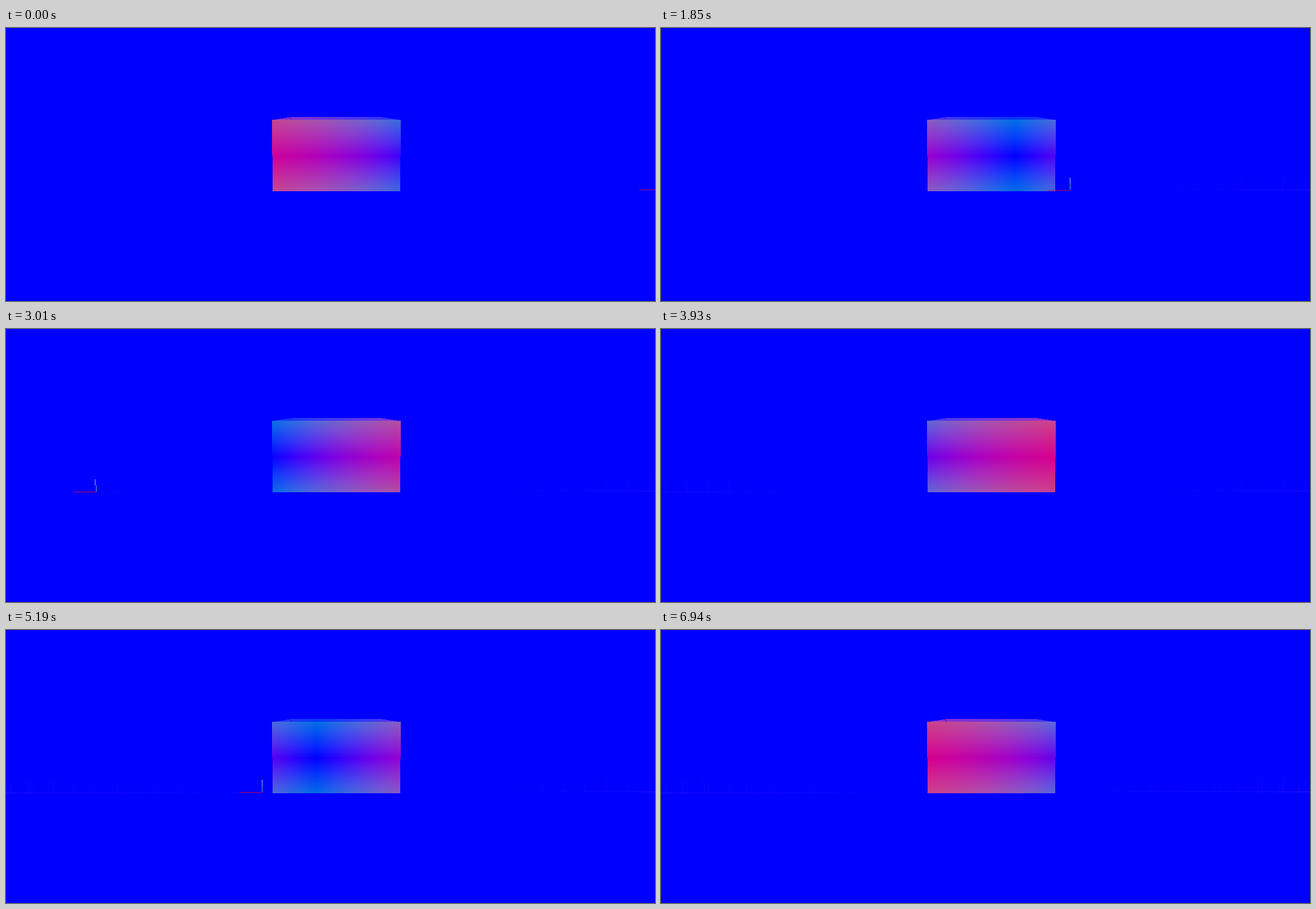
An HTML page with a canvas for the animation above (7010 ms loop, 1154x485 px).

```html
<!DOCTYPE html>
<html lang="en">
<head>
<meta charset="utf-8">
<title>Box lit by a moving light</title>
<style>
  html, body { margin: 0; width: 100%; height: 100%; overflow: hidden; background: #00f; }
  canvas { display: block; }
</style>
</head>
<body>
<canvas id="stage" width="1154" height="485"></canvas>
<script>
const ctx = document.getElementById('stage').getContext('2d');
const LOOP = 7010, TICKS = 90, TICK = LOOP / TICKS, LEAD = 45;
const BOX = { x: 472, y: 158, w: 231, h: 132, rim: 5 };
const MIDDLE = 589;                            // the light swings around this x
const REACH = 811, SWING = 42.9, PEAK = 6.2;   // px, ticks per swing, tick at far right
const PARALLAX = 0.287;                        // light movement as seen on the box

const image = ctx.createImageData(BOX.w, BOX.h);
const mix = (a, b, k) => a + (b - a) * k;

// Constant speed back and forth between two turning points.
function lightX(tick) {
  const phase = Math.abs(tick - PEAK) / SWING % 2;
  return Math.round(MIDDLE + REACH * (2 * Math.abs(phase - 1) - 1));
}

// Each pixel shows the absolute direction towards the light as a colour.
function drawBox(light) {
  const centre = MIDDLE + (light - MIDDLE) * PARALLAX;
  for (let row = 0; row < BOX.h; row++) {
    const onTop = row < BOX.rim;
    const k = onTop ? row / BOX.rim : (row - BOX.rim) / (BOX.h - BOX.rim);
    const left = Math.round(onTop ? mix(506, 473, k) : mix(473, 474, k));
    const right = Math.round(onTop ? mix(669, 702, k) : mix(702, 701, k));
    const dy = onTop ? 90 : Math.abs(BOX.y + row - 227) * 1.6;
    const depth = onTop ? 400 : 214;
    for (let col = 0; col < BOX.w; col++) {
      const x = BOX.x + col;
      const dx = Math.abs(x - centre);
      const scale = 255 / Math.hypot(dx, dy, depth);
      const inside = x >= left && x < right;
      const colour = inside ? [dx * scale, dy * scale, depth * scale, 255] : [0, 0, 255, 255];
      image.data.set(colour, (row * BOX.w + col) * 4);
    }
  }
  ctx.putImageData(image, BOX.x, BOX.y);
  ctx.fillStyle = '#280078';
  ctx.fillRect(506, 160, 1, 2);
}

function drawAxes(x, across, low, high) {
  const y = Math.round(289 - x * 0.002);
  const lean = Math.round((x - MIDDLE) * 0.0035);
  ctx.fillStyle = across;
  ctx.fillRect(x - 40, y, 40, 1);
  ctx.fillStyle = low;
  ctx.fillRect(x, y - 11, 1, 11);
  ctx.fillStyle = high;
  ctx.fillRect(x + lean, y - 22, 1, 11);
}

// Faint traces stay behind, clearer towards the sides.
function drawTrace(x) {
  const strength = 0.02 + 0.13 * ((x - MIDDLE) / 577) ** 2;
  const colour = `rgba(110,60,255,${strength})`;
  drawAxes(x, colour, colour, colour);
}

function draw() {
  const t = (performance.now() - begin) % LOOP;
  const tick = Math.min(TICKS - 1, Math.floor((t + LEAD) / TICK));
  ctx.fillStyle = '#00f';
  ctx.fillRect(0, 0, 1154, 485);
  for (let past = 0; past < tick; past++) drawTrace(lightX(past));
  drawBox(lightX(tick));
  drawAxes(lightX(tick), '#d2003c', '#3cc878', '#78dce6');
  requestAnimationFrame(draw);
}

const begin = performance.now();
draw();
</script>
</body>
</html>
```
